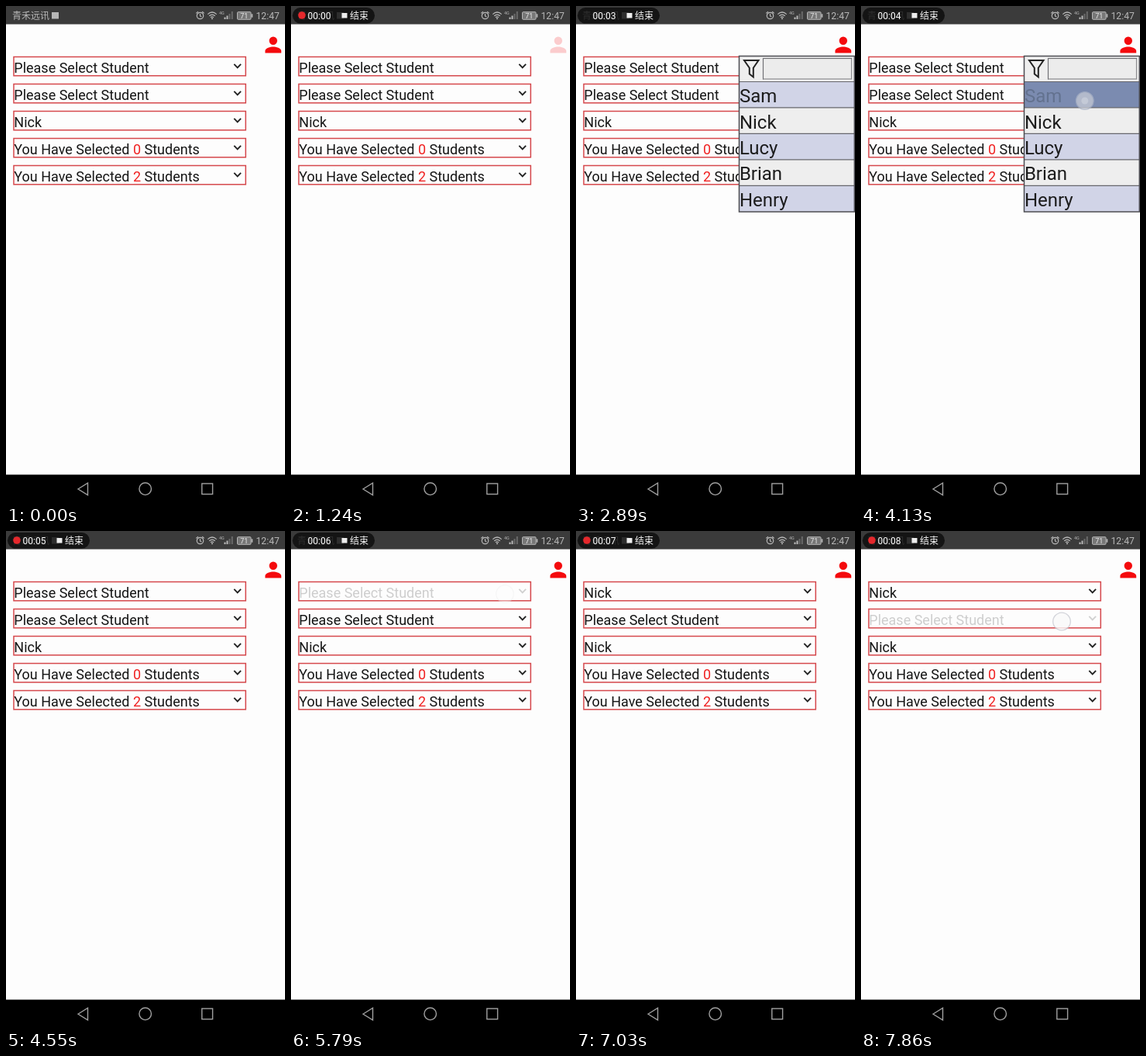
An HTML page for the animation above (8000 ms loop, 360x640 px).

```html
<!DOCTYPE html>
<html lang="en">
<head>
<meta charset="utf-8">
<title>Student select</title>
<style>
  html, body { margin: 0; width: 100%; height: 100%; overflow: hidden; background: #fdfdfd; }
  svg { display: block; width: 100%; height: 100%; }
  text { font-family: Roboto, "Noto Sans CJK SC", "Noto Sans CJK", sans-serif; white-space: pre; }
  .label { font-size: 18px; fill: #151515; }
  .item { font-size: 24px; fill: #1c1c1c; }
  .cjk { font-family: "Noto Sans CJK SC", "Noto Sans CJK", sans-serif; font-size: 12px; }
  .count { fill: #f02222; }
  .box { fill: none; stroke: #d5484c; stroke-width: 1.5; }
  .chevron { fill: none; stroke: #222; stroke-width: 1.9; }
  .edge { fill: none; stroke: #4c4c52; stroke-width: 1.5; }
  .line { stroke: #66666c; stroke-width: 1.2; }
  .nav { fill: none; stroke: #a0a0a0; stroke-width: 1.4; }
  .thin { fill: none; stroke: #b8b8b8; stroke-width: 1.2; }
</style>
</head>
<body>
<svg viewBox="0 0 360 640" preserveAspectRatio="none">
  <rect width="360" height="640" fill="#fdfdfd"/>
  <rect width="360" height="23.5" fill="#3b3b3b"/>

  <g fill="#b8b8b8">
    <text class="cjk" x="8" y="16.8">青禾远讯</text>
    <rect x="59" y="8" width="9" height="8.5"/>
    <circle class="thin" cx="250.5" cy="12.5" r="4.2"/>
    <path class="thin" d="M250.5 10V12.8L252.3 14M245.3 9.4L248 7.2M255.7 9.4L253 7.2"/>
    <path class="thin" d="M260.3 10.6Q266 5.4 271.7 10.6M262.2 12.8Q266 9.4 269.8 12.8M264 14.8Q266 13 268 14.8"/>
    <circle cx="266" cy="16.3" r="1"/>
    <text x="275" y="10.8" font-size="5.5">4G</text>
    <path d="M281.5 14.5h2V17h-2zM284.5 12.5h2V17h-2z"/>
    <path d="M287.5 10h2V17h-2zM290.8 7h2V17h-2z" fill="#6a6a6a"/>
    <rect x="298.5" y="7.7" width="17.5" height="9.6" rx="1" fill="#777" stroke="#b8b8b8"/>
    <rect x="316.5" y="10.3" width="1.8" height="4.4"/>
    <text x="307.2" y="15.7" font-size="9" text-anchor="middle" fill="#eee">71</text>
    <text x="322.5" y="17" font-size="12.2">12:47</text>
  </g>

  <g id="pill">
    <rect x="2" y="2" width="106" height="20.5" rx="10.2" fill="#0b0b0b" fill-opacity=".8"/>
    <circle id="dot" cx="14" cy="12" r="4.8" fill="#e5282c"/>
    <text id="clock" x="21.5" y="16.6" font-size="12" fill="#fff"></text>
    <rect x="65.5" y="9" width="7" height="6.5" fill="#eee"/>
    <text class="cjk" x="76" y="16.8" fill="#f4f4f4">结束</text>
  </g>

  <path id="person" transform="translate(329.2 34.4) scale(1.3)"
    d="M12 12a4 4 0 1 0 0-8a4 4 0 0 0 0 8zM12 14c-2.7 0-8 1.3-8 4v2h16v-2c0-2.7-5.3-4-8-4z"/>

  <g id="rows"></g>

  <g id="menu">
    <rect x="210.5" y="64.5" width="149" height="33" fill="#eee"/>
    <path d="M217 70H235.5L228.8 79.8V91.5L223.8 87.5V79.8Z" fill="none" stroke="#222" stroke-width="2"/>
    <rect x="241.5" y="67.5" width="114" height="26.5" fill="#ececec" stroke="#8c8c90" stroke-width="1.2"/>
    <path d="M241.5 94.5V67.5H356" fill="none" stroke="#707074"/>
    <g id="menuItems"></g>
    <path class="edge" d="M210.5 64.5H359.3V265H210.5Z"/>
  </g>

  <g id="list">
    <g id="listItems"></g>
    <path class="edge" d="M10 90.7H309.3V258H10Z"/>
  </g>

  <g id="touch">
    <circle r="11.3" stroke-width="1.3"/>
    <circle r="4.5" fill="#fff"/>
  </g>

  <rect y="603.5" width="360" height="36.5" fill="#000"/>
  <path class="nav" d="M93 622L105.5 614.2V629.8Z"/>
  <circle class="nav" cx="179.7" cy="621.8" r="7.8"/>
  <rect class="nav" x="252.8" y="615" width="13.8" height="13.6"/>
</svg>
<script>
const LOOP = 8000;
const NAMES = ['Sam', 'Nick', 'Lucy', 'Brian', 'Henry'];
const PROMPT = 'Please Select Student';
const PITCH = 33.45;
const $ = id => document.getElementById(id);

const picked = n => `You Have Selected <tspan class="count">${n}</tspan> Students`;

$('rows').innerHTML = [PROMPT, PROMPT, NAMES[1], picked(0), picked(2)].map((label, i) => {
  const y = 65.5 + i * 35;
  return `<rect class="box" x="10" y="${y}" width="299.3" height="24.3"/>
    <g><text class="label" x="10.3" y="${y + 20}">${label}</text>
    <path class="chevron" d="M294.3 ${y + 9.4}l4.4 4.5l4.4-4.5"/></g>`;
}).join('');

function fillItems(id, x, top, width) {
  $(id).innerHTML = NAMES.map((name, i) => {
    const y = top + i * PITCH;
    return `<rect x="${x}" y="${y}" width="${width}" height="${PITCH}" fill="${i % 2 ? '#eeeeee' : '#d1d4e7'}"/>
      <path class="line" d="M${x} ${y}h${width}"/>
      <text class="item" x="${x + 0.4}" y="${y + 26.6}">${name}</text>`;
  }).join('');
}
fillItems('menuItems', 210.5, 97.5, 149);
fillItems('listItems', 10, 90.7, 299.3);

const rowParts = [...document.querySelectorAll('#rows > g')];
const firstLabel = rowParts[0].querySelector('text');
const hotBox = $('menuItems').querySelector('rect');
const hotText = $('menuItems').querySelector('text');
const ring = $('touch').querySelector('circle');
const core = $('touch').lastElementChild;

const within = (t, a, b) => t >= a && t < b;
const show = (el, on) => el.setAttribute('visibility', on ? 'visible' : 'hidden');

// Start times of the recorder's seconds and the on/off spans of its dot
const TICKS = [1650, 2060, 2890, 3720, 4550, 5790, 6620, 7860];
const BLINKS = [[410, 820], [1240, 1650], [3720, 4130], [4550, 4960], [6200, 6620], [7030, 7440], [7860, LOOP]];

const TOUCHES = [
  { from: 4130, to: 4550, x: 288.8, y: 122, fill: '#c6cad4', line: '#a9b2c6', alpha: 0.75, core: 0.4 },
  { from: 5790, to: 6200, x: 276, y: 81, fill: '#fff', line: '#ececec', alpha: 0.4, core: 0 },
  { from: 6620, to: 7030, x: 174, y: 144.3, fill: '#fafafc', line: '#b9bcc8', alpha: 0.85, core: 0 },
  { from: 7860, to: LOOP, x: 259, y: 116.5, fill: '#fafafa', line: '#c9cad2', alpha: 0.8, core: 0 }
];

function draw(t) {
  show($('pill'), t >= 410);
  show($('dot'), BLINKS.some(([a, b]) => within(t, a, b)));
  $('clock').textContent = '00:0' + TICKS.filter(s => t >= s).length;

  $('person').setAttribute('fill', within(t, 6200, 7030) ? '#c00000' : '#f40a0d');
  $('person').setAttribute('opacity', within(t, 1240, 1650) ? 0.2 : 1);

  firstLabel.textContent = t >= 7030 ? NAMES[1] : PROMPT;
  rowParts[0].setAttribute('opacity', within(t, 5790, 6200) ? 0.2 : 1);
  rowParts[1].setAttribute('opacity', t >= 7860 ? 0.2 : 1);

  show($('menu'), within(t, 1650, 4550));
  show($('list'), within(t, 6200, 7030));

  const hot = within(t, 4130, 4550);
  hotBox.setAttribute('fill', hot ? '#7b8bb0' : '#d1d4e7');
  hotText.style.fill = hot ? '#63728f' : '';

  const touch = TOUCHES.find(p => within(t, p.from, p.to));
  show($('touch'), touch);
  if (touch) {
    $('touch').setAttribute('transform', `translate(${touch.x} ${touch.y})`);
    $('touch').setAttribute('opacity', touch.alpha);
    ring.setAttribute('fill', touch.fill);
    ring.setAttribute('stroke', touch.line);
    core.setAttribute('opacity', touch.core);
  }
}

const start = performance.now();
function frame() {
  draw((performance.now() - start) % LOOP);
  requestAnimationFrame(frame);
}
frame();
</script>
</body>
</html>
```
